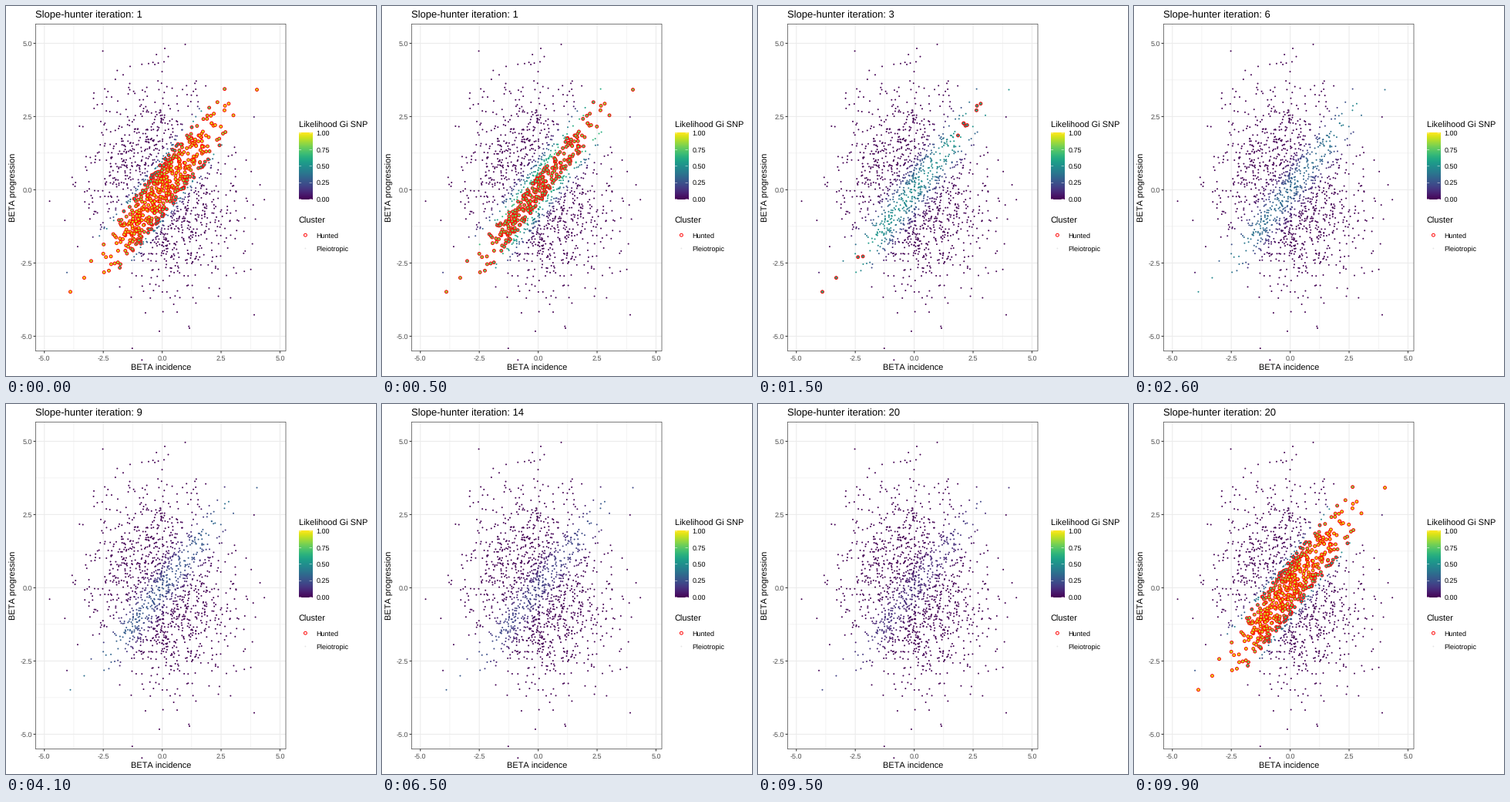
Animation, 480 px wide and 480 px high, one loop 10 s. Source, as a matplotlib script:

```python
import matplotlib.pyplot as plt
import numpy as np
from matplotlib.animation import FuncAnimation
from matplotlib.patches import Rectangle

plt.rcParams.update({
    "font.family": "Liberation Sans",
    "text.hinting": "none",
    "text.hinting_factor": 1,
})

SIZE, DPI = 480, 72            # at 72 dpi one point is one pixel
X0, Y0, SX, SY = 202.6, 238.4, 30.57, 38.0
LEFT, RIGHT, TOP, BOTTOM = 38.4, 363, 23.3, 447.6
VIRIDIS = plt.get_cmap("viridis")

# Frame at which each iteration begins
STARTS = [0, *range(6, 50, 5), *range(50, 100, 5)]
# Log-odds at the centre: a fast drop, then a slow linear decline
PEAK = [2.7, 0.5, 0.12, -0.22, -0.35] + [-0.78 - 0.08 * i for i in range(15)]


def to_px(x, y):
    return X0 + SX * x, Y0 - SY * y


def make_points():
    rng = np.random.default_rng(7)
    x = rng.normal(0.1, 1.5, 1380)
    y = rng.normal(0, 1.62, 1380) - 0.14 * x
    bx = rng.normal(0, 1.5, 90)
    by = bx + rng.normal(0, 0.45, 90)
    return np.append(x, bx), np.append(y, by)


def log_odds(x, y, k):
    across, along = y - x, (x + y) / 2
    width = 0.33 if k == 1 else 0.45
    return PEAK[k - 1] + 0.067 * along**2 - across**2 / width


px, py = make_points()
points = np.column_stack(to_px(px, py))
odds = np.array([log_odds(px, py, k) for k in range(1, 21)])
likelihood = 1 / (1 + np.exp(-odds))
hunted = odds > 0

# Each change of state eases through one in-between frame, the sixth through two
knots, states = [0], [1]
for k, start in enumerate(STARTS[1:], 2):
    knots += [start - 2, start + (k == 6)]
    states += [k - 1, k]

fig = plt.figure(figsize=(SIZE / DPI, SIZE / DPI), dpi=DPI, facecolor="white")
ax = fig.add_axes([0, 0, 1, 1])
ax.axis("off")


def text(x, y, s, size, color="black", **kw):
    return ax.text(x, y, s, fontsize=size, color=color, **kw)


def line(xs, ys, color, width, z=1):
    ax.plot(xs, ys, color=color, lw=width, zorder=z,
            solid_capstyle="butt", snap=False)


def grid(v, width):
    x, y = to_px(v, v)
    line([x, x], [TOP, BOTTOM], "#ebebeb", width)
    line([LEFT, RIGHT], [y, y], "#ebebeb", width)
    return x, y


def draw_panel():
    for v in (-3.75, -1.25, 1.25, 3.75):
        grid(v, 0.53)
    for v in (-5, -2.5, 0, 2.5, 5):
        x, y = grid(v, 1.07)
        line([x, x], [BOTTOM, BOTTOM + 2.8], "#333333", 1.07)
        line([LEFT - 2.8, LEFT], [y, y], "#333333", 1.07)
        text(x, 460, f"{v:.1f}", 8.8, "#4d4d4d", ha="center")
        text(34, y + 3.2, f"{v:.1f}", 8.8, "#4d4d4d", ha="right")
    ax.add_patch(Rectangle((LEFT, TOP), RIGHT - LEFT, BOTTOM - TOP, fill=False,
                           ec="#333333", lw=0.65, zorder=5, snap=False))
    text(200.7, 473, "BETA incidence", 11, ha="center")
    text(10.3, 235.5, "BETA progression", 11, rotation=90,
         ha="center", va="center")


def draw_legend():
    text(379.7, 158, "Likelihood Gi SNP", 11)
    x0, x1, y0, y1 = 379.7, 397, 164.7, 251
    ax.imshow(np.linspace(1, 0, 256)[:, None], cmap=VIRIDIS, aspect="auto",
              extent=(x0, x1, y1, y0), zorder=2)
    for i in range(5):
        y = 250.6 - 21.4 * i
        line([x0, x0 + 3.4], [y, y], "white", 0.5, 3)
        line([x1 - 3.4, x1], [y, y], "white", 0.5, 3)
        text(402.5, y + 3.1, f"{i / 4:.2f}", 8.8)
    text(379.7, 282, "Cluster", 11)
    ax.scatter([388.4], [297.2], s=15, fc="none", ec="red", lw=0.95)
    ax.scatter([388.4], [314.5], s=3.5, fc="#e6e6e6", ec="none")
    text(402.5, 300.7, "Hunted", 8.8)
    text(402.5, 318, "Pleiotropic", 8.8)


draw_panel()
draw_legend()
ax.set(xlim=(0, SIZE), ylim=(SIZE, 0))
title = text(38.5, 15, "", 13.2)
dots = ax.scatter([], [], s=4, lw=0, zorder=3)
rings = ax.scatter([], [], s=15, lw=0.95, zorder=4)
rings.set_edgecolor("red")


def update(frame):
    iteration = sum(start <= frame for start in STARTS)
    title.set_text(f"Slope-hunter iteration: {iteration}")

    # The last frame is already back at the first state
    state = 1 if frame == 99 else np.interp(frame, knots, states)
    lo, hi = int(np.floor(state)), int(np.ceil(state))
    mix = state - lo
    p = (1 - mix) * likelihood[lo - 1] + mix * likelihood[hi - 1]
    member = hunted[hi - 1]
    colors = VIRIDIS(p)

    dots.set_offsets(points[~member])
    dots.set_facecolor(colors[~member])
    rings.set_visible(member.any())
    rings.set_offsets(points[member])
    rings.set_facecolor(colors[member])
    return title, dots, rings


anim = FuncAnimation(fig, update, frames=100, interval=100,
                     repeat=True, repeat_delay=0, blit=False)
plt.show()
```
